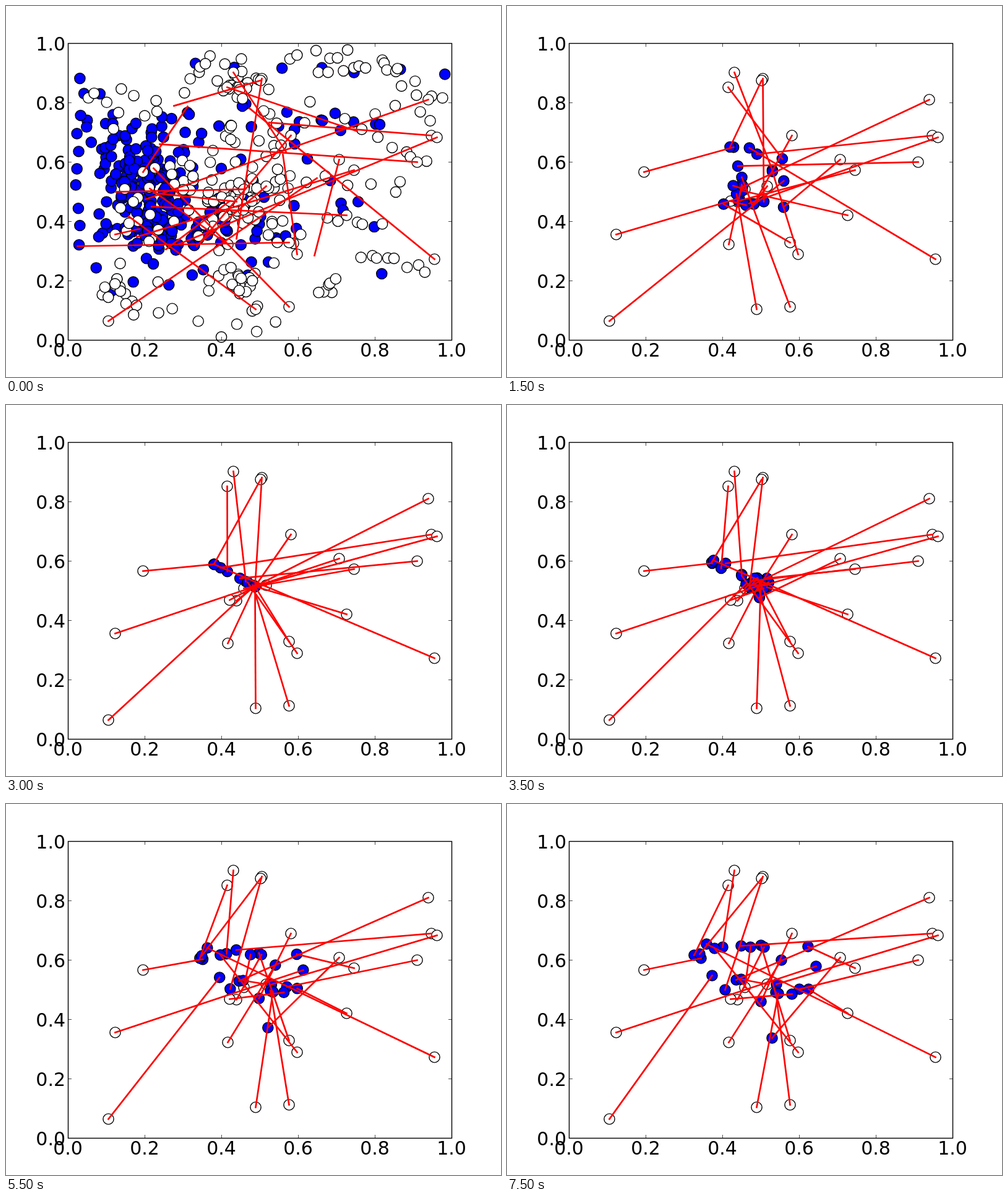
Write an HTML page with a canvas that moves like this. It is 800x600 px and loops after 8000 ms.

```html
<!DOCTYPE html>
<html lang="en">
<head>
<meta charset="utf-8">
<style>
html, body { margin: 0; width: 100%; height: 100%; overflow: hidden; background: #fff; }
canvas { display: block; }
</style>
</head>
<body>
<canvas id="stage" width="800" height="600"></canvas>
<script>
const ctx = document.getElementById('stage').getContext('2d');
const LOOP = 8000, STEP = 500, GATHER = 1000, PINCH = 3000, END = 7500;
const BLUE = '#00f', WHITE = '#fff';

// A link ties a fixed point to a mover, given by its start and finish.
const links = [];
function link(x, y, startX, startY, endX, endY) {
  links.push({ x, y, start: [startX, startY], end: [endX, endY] });
}

link(165, 509, 502, 278, 331, 277);
link(176, 369, 215, 360, 499, 262);
link(221, 268, 293, 162, 313, 249);
link(357, 131, 567, 202, 302, 244);
link(367, 107, 452, 235, 348, 231);
link(413, 117, 372, 376, 352, 300);
link(411, 120, 271, 161, 311, 242);
link(460, 209, 308, 388, 410, 319);
link(682, 151, 225, 312, 370, 284);
link(687, 209, 425, 188, 378, 229);
link(696, 212, 278, 385, 435, 291);
link(664, 252, 248, 223, 472, 299);
link(562, 265, 211, 373, 486, 230);
link(538, 248, 498, 403, 428, 378);
link(550, 338, 235, 324, 487, 299);
link(692, 409, 393, 165, 322, 226);
link(470, 401, 447, 240, 335, 233);
link(457, 382, 115, 388, 410, 228);
link(457, 486, 238, 262, 434, 304);
link(403, 490, 198, 340, 438, 306);
link(358, 385, 232, 295, 443, 252);
link(372, 316, 238, 302, 415, 231);
link(361, 315, 258, 393, 460, 307);
link(384, 296, 177, 300, 393, 231);
link(420, 291, 308, 387, 378, 283);

// The opening scatter is built from seeded clouds and loose trails.
let seed = 71;
function rand() {
  seed = (seed * 16807) % 2147483647;
  return seed / 2147483647;
}
function bell() { return (rand() + rand() + rand() + rand() - 2) * 1.73; }

function cloud(dots, n, x, y, sx, sy) {
  while (n--) dots.push([x + bell() * sx, y + bell() * sy]);
}
function trail(dots, n, x0, y0, x1, y1, spread) {
  for (let i = 0; i < n; i++) {
    const k = i / (n - 1);
    cloud(dots, 1, mix(x0, x1, k), mix(y0, y1, k), spread, spread);
  }
}

const blueDots = [], whiteDots = [];
cloud(blueDots, 120, 222, 305, 34, 40);
cloud(blueDots, 34, 200, 240, 26, 24);
cloud(blueDots, 34, 255, 358, 38, 20);
cloud(blueDots, 26, 335, 330, 42, 34);
cloud(blueDots, 14, 285, 200, 28, 26);
cloud(blueDots, 9, 435, 370, 30, 30);
trail(blueDots, 7, 140, 122, 160, 210, 14);
trail(blueDots, 8, 113, 175, 116, 385, 3);
trail(blueDots, 7, 309, 96, 703, 112, 6);
trail(blueDots, 14, 375, 180, 606, 189, 10);
trail(blueDots, 9, 470, 225, 598, 404, 20);
trail(blueDots, 8, 140, 432, 365, 425, 12);

cloud(whiteDots, 62, 370, 320, 36, 26);
cloud(whiteDots, 20, 380, 118, 26, 16);
cloud(whiteDots, 20, 376, 450, 26, 20);
cloud(whiteDots, 16, 400, 205, 36, 24);
cloud(whiteDots, 14, 215, 345, 32, 40);
cloud(whiteDots, 8, 420, 375, 30, 20);
cloud(whiteDots, 6, 300, 258, 25, 12);
cloud(whiteDots, 14, 180, 458, 24, 18);
trail(whiteDots, 5, 124, 150, 201, 147, 10);
trail(whiteDots, 6, 175, 195, 282, 150, 8);
trail(whiteDots, 5, 289, 95, 349, 78, 10);
trail(whiteDots, 8, 458, 95, 554, 88, 9);
trail(whiteDots, 14, 555, 90, 690, 140, 12);
trail(whiteDots, 8, 475, 175, 690, 182, 10);
trail(whiteDots, 5, 605, 217, 677, 250, 6);
trail(whiteDots, 7, 465, 280, 646, 304, 14);
trail(whiteDots, 5, 520, 358, 597, 337, 10);
trail(whiteDots, 8, 575, 400, 681, 424, 4);
trail(whiteDots, 8, 223, 509, 437, 509, 10);
trail(whiteDots, 6, 514, 470, 538, 434, 10);

function mix(a, b, k) { return a + (b - a) * k; }
function blend(p, q, k) { return [mix(p[0], q[0], k), mix(p[1], q[1], k)]; }
function easeOut(k) { return 1 - (1 - k) * (1 - k); }

// Movers first draw in around the middle, then collapse onto a short diagonal.
function gather([x, y]) { return [257 + 0.45 * x, 108 + 0.6 * y]; }
function pinch([, y]) {
  const k = Math.tanh((y - 212) / 35);
  return [367 + 35 * k, 274 + 19 * k];
}

function place({ start, end }, t) {
  if (t < GATHER) return start;
  const tight = pinch(start);
  return t < PINCH
    ? blend(gather(start), tight, easeOut((t - GATHER) / (PINCH - GATHER)))
    : blend(tight, end, easeOut((t - PINCH) / (END - PINCH)));
}

function circle(x, y, fill) {
  ctx.beginPath();
  ctx.arc(x, y, 8.6, 0, Math.PI * 2);
  ctx.fillStyle = fill;
  ctx.fill();
  ctx.stroke();
}

function line(x0, y0, x1, y1) {
  ctx.beginPath();
  ctx.moveTo(x0, y0);
  ctx.lineTo(x1, y1);
  ctx.stroke();
}

function drawAxes() {
  ctx.strokeStyle = ctx.fillStyle = '#000';
  ctx.font = '30px "DejaVu Sans", sans-serif';
  ctx.lineCap = 'butt';
  ctx.lineWidth = 0.7;
  for (let i = 0; i <= 5; i++) {
    const x = 100 + 124 * i, y = 540 - 96 * i, label = (i / 5).toFixed(1);
    line(x, 540, x, 534.5);
    line(x, 60, x, 65.5);
    line(100, y, 105.5, y);
    line(720, y, 714.5, y);
    ctx.textAlign = 'center';
    ctx.fillText(label, x - 0.5, 566.5);
    ctx.textAlign = 'right';
    ctx.fillText(label, 95.5, y + 11.5);
  }
  ctx.lineWidth = 1.4;
  ctx.strokeRect(100, 60, 620, 480);
}

function draw(t) {
  ctx.setTransform(1, 0, 0, 1, 0.5, 0.5);
  ctx.fillStyle = WHITE;
  ctx.fillRect(-1, -1, 802, 602);
  ctx.strokeStyle = '#000';
  ctx.lineWidth = 1.4;
  const ends = links.map(l => place(l, t));
  const opening = t < GATHER;
  if (opening) {
    for (const [x, y] of blueDots) circle(x, y, BLUE);
    for (const [x, y] of whiteDots) circle(x, y, WHITE);
  }
  for (const { x, y } of links) circle(x, y, WHITE);
  if (!opening) for (const [x, y] of ends) circle(x, y, BLUE);
  ctx.strokeStyle = '#f00';
  ctx.lineWidth = 2.7;
  ctx.lineCap = 'square';
  links.forEach(({ x, y }, i) => line(x, y, ...ends[i]));
  drawAxes();
}

let shown = -1;
function tick() {
  const now = performance.now() % LOOP;
  const t = now < GATHER ? 0 : Math.floor(now / STEP) * STEP;
  if (t !== shown) draw(shown = t);
  requestAnimationFrame(tick);
}
tick();
</script>
</body>
</html>
```
